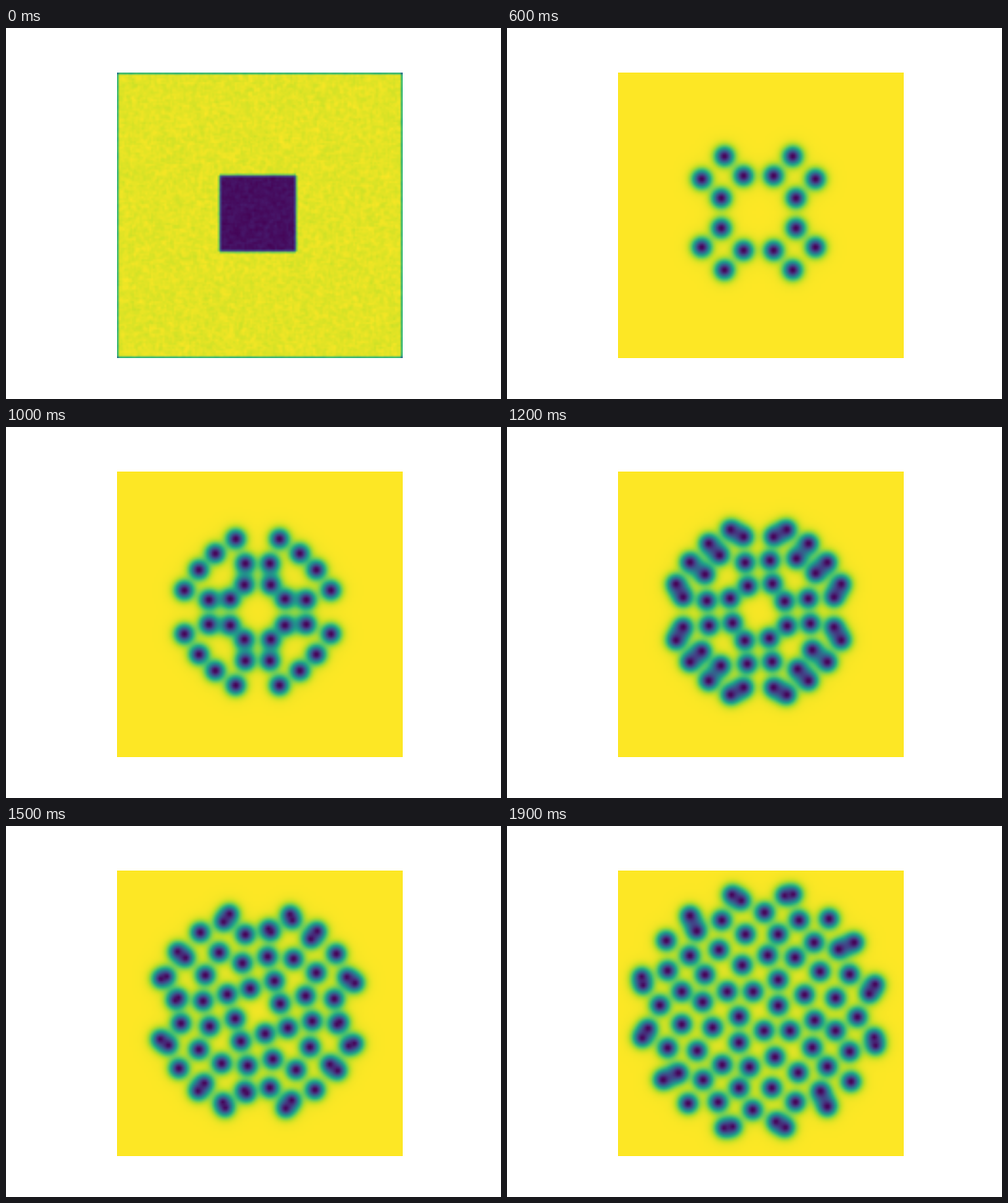
Write an HTML page with a canvas that moves like this. It is 544x408 px and loops after 2 s.

```html
<!DOCTYPE html>
<html lang="en">
<head>
<meta charset="utf-8">
<title>Dividing spots</title>
<style>
html, body { margin: 0; width: 100%; height: 100%; overflow: hidden; background: #fff; }
canvas { display: block; }
</style>
</head>
<body>
<canvas id="stage" width="544" height="408"></canvas>
<script>
const STEP = 100, STEPS = 20;
const LEFT = 121.72, TOP = 48.96, SIZE = 314.16, N = 150, CELL = SIZE / N;
const CENTER_X = 276.5, CENTER_Y = 203.5;

const stage = document.getElementById('stage').getContext('2d');
const plate = document.createElement('canvas');
plate.width = plate.height = N;
const plateCtx = plate.getContext('2d');
const image = plateCtx.createImageData(N, N);
const field = new Float32Array(N * N);

const COLORS = [
  [68, 1, 84], [72, 36, 117], [65, 68, 135], [53, 95, 141], [42, 120, 142], [33, 145, 140],
  [34, 168, 132], [68, 191, 112], [122, 209, 81], [189, 223, 38], [253, 231, 37]
];
const clamp = (v, lo, hi) => Math.max(lo, Math.min(hi, v));
const distance = (a, b) => Math.hypot(a[0] - b[0], a[1] - b[1]);

// Offsets from the centre repeat in four quarter turns; mirrored ones also flip.
const turned = (...offsets) => offsets.flatMap(([x, y]) => [[x, y], [-y, x], [-x, -y], [y, -x]]);
const mirrored = (...offsets) =>
  offsets.flatMap(([x, y]) => x === y ? turned([x, y]) : turned([x, y], [-x, y]));

// These hardly move once the cluster is crowded.
const settled = turned([-40.5, -100], [-14.5, -84.5], [-43.5, -67.5], [10, -61.5],
  [40, -59], [-18, -50.5], [21.5, -34.5], [-6, -21.5]);

const poses = [
  { at: 1, spots: mirrored([39.5, 39.5]) },
  { at: 3, spots: mirrored([32.5, 46.5]) },
  { at: 6, spots: mirrored([37.5, 62.5], [16.5, 41]) },
  { at: 10, spots: mirrored([24, 80.5], [46.5, 64.5], [13.5, 53.5], [14.5, 30]) },
  { at: 13, spots: [
    ...mirrored([34.5, 96], [59, 81], [12.5, 84]),
    ...turned([-41, -61.5], [39, -56], [-15.5, -55], [12, -58.5], [-10.5, -28], [15.5, -32])] },
  { at: 17, spots: [...settled,
    ...turned([-27, -118], [36.5, -117], [42, -104], [-67, -92], [17, -90], [11, -97],
      [72, -95], [58, -77.5])] },
  { at: 19, spots: [...settled,
    ...turned([-29.5, -128], [-19, -121.5], [28.5, -127], [38, -128.5], [-75.5, -105],
      [-68, -88], [6.5, -108.5], [21.5, -84.5], [44.5, -100], [77.5, -101.5], [61, -75.5])] }
];

// Every spot keeps its closest successor; the rest split off as second children.
function findParents(before, after) {
  const pairs = after.flatMap((a, child) => before.map((b, parent) =>
    ({ child, parent, d: distance(a, b) })));
  pairs.sort((p, q) => p.d - q.d);
  const parents = [], used = before.map(() => 0);
  for (const limit of [1, 2])
    for (const { child, parent } of pairs)
      if (parents[child] === undefined && used[parent] < limit) {
        parents[child] = parent;
        used[parent]++;
      }
  return parents;
}
poses.slice(1).forEach((pose, i) => pose.parents = findParents(poses[i].spots, pose.spots));

// Returns one family per parent: a single spot, or two that are dividing.
function familiesAt(step) {
  const i = poses.findIndex(p => p.at >= step), pose = poses[i], last = poses[i - 1];
  if (!last) return pose.spots.map(s => [s]);
  const k = (step - last.at) / (pose.at - last.at);
  const families = last.spots.map(() => []);
  pose.spots.forEach(([x, y], j) => {
    const parent = pose.parents[j], [px, py] = last.spots[parent];
    families[parent].push([px + (x - px) * k, py + (y - py) * k]);
  });
  return families;
}

function stamp([x, y], core, halo, weight = 1) {
  const cx = (CENTER_X + x - LEFT) / CELL - 0.5, cy = (CENTER_Y + y - TOP) / CELL - 0.5;
  const reach = 18;
  for (let j = Math.max(0, Math.ceil(cy - reach)); j <= Math.min(N - 1, cy + reach); j++)
    for (let i = Math.max(0, Math.ceil(cx - reach)); i <= Math.min(N - 1, cx + reach); i++) {
      const r2 = ((i - cx) ** 2 + (j - cy) ** 2) * CELL * CELL;
      const left = 1 - core * Math.exp(-r2 / 92) - halo * Math.exp(-r2 / 320);
      field[j * N + i] *= Math.max(0, left) ** weight;
    }
}

function fillSpots(step) {
  field.fill(1);
  for (const [a, b] of familiesAt(step)) {
    // Two halves weigh as much as one spot until they come apart.
    const d = b ? distance(a, b) : Infinity;
    const weight = 0.5 + 0.5 * clamp(d / 20, 0, 1);
    stamp(a, 0.97, 0.03, weight);
    if (!b) continue;
    stamp(b, 0.97, 0.03, weight);
    const neck = clamp(Math.min((25 - d) / 10, (d - 8) / 16), 0, 0.45);
    if (neck) stamp([(a[0] + b[0]) / 2, (a[1] + b[1]) / 2], neck, 0);
  }
}

// A noisy plate with a low square, blurred by one diffusion step against an empty rim.
function fillSquare() {
  let seed = 7;
  const random = () => (seed = (Math.imul(seed, 1664525) + 1013904223) >>> 0) / 2 ** 32;
  const inside = (i, j) => Math.max(Math.abs(i - 73.5), Math.abs(j - 73.5)) < 20;
  const raw = Float32Array.from(field, (_, n) =>
    (inside(n % N, Math.floor(n / N)) ? 0.48 : 1) + 0.05 * random());
  const at = (i, j) => i < 0 || j < 0 || i >= N || j >= N ? 0 : raw[j * N + i];
  for (let j = 0; j < N; j++)
    for (let i = 0; i < N; i++) {
      const around = at(i - 1, j) + at(i + 1, j) + at(i, j - 1) + at(i, j + 1);
      field[j * N + i] = (0.36 * at(i, j) + 0.16 * around - 0.483) / 0.565;
    }
}

function paint() {
  field.forEach((v, i) => {
    const s = clamp(v, 0, 1) * 10, n = Math.min(9, Math.floor(s));
    for (let c = 0; c < 3; c++)
      image.data[i * 4 + c] = COLORS[n][c] + (COLORS[n + 1][c] - COLORS[n][c]) * (s - n);
    image.data[i * 4 + 3] = 255;
  });
  plateCtx.putImageData(image, 0, 0);
  stage.fillStyle = '#fff';
  stage.fillRect(0, 0, 544, 408);
  stage.drawImage(plate, LEFT, TOP, SIZE, SIZE);
}

let shown = -1;
const begin = performance.now();
function tick() {
  const step = Math.floor((performance.now() - begin) / STEP) % STEPS;
  if (step !== shown) {
    shown = step;
    if (step === 0) fillSquare(); else fillSpots(step);
    paint();
  }
  requestAnimationFrame(tick);
}
tick();
</script>
</body>
</html>
```
